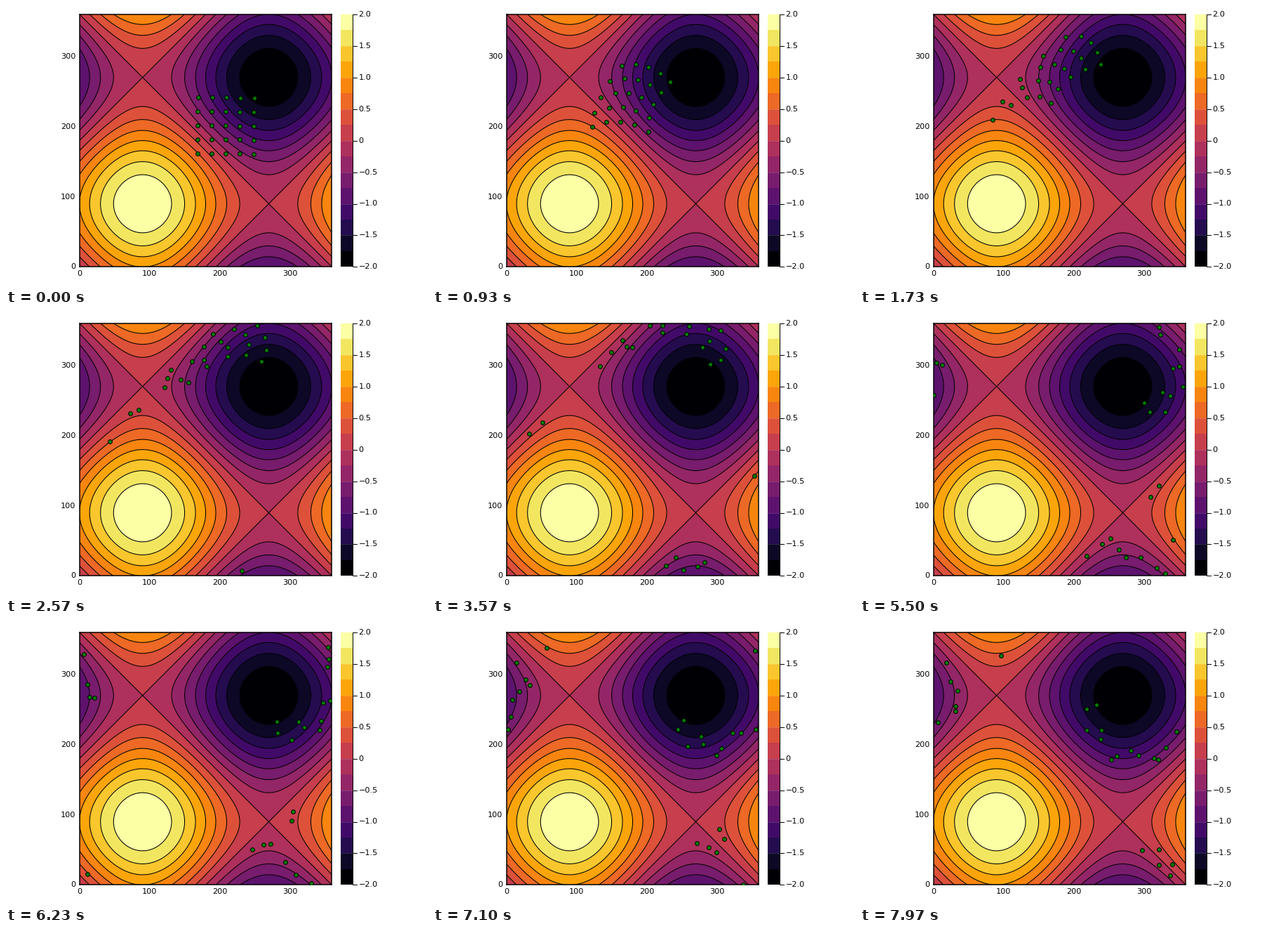
Recreate the animation shown at these times as a matplotlib script. Size 600x400 px, loop 8 s.

```python
import numpy as np
import matplotlib.pyplot as plt
from matplotlib.animation import FuncAnimation
from matplotlib.colors import ListedColormap
from matplotlib.patches import Rectangle

W, H, DPI = 600, 400, 100
PX = 72 / DPI                       # points per pixel
LEFT, RIGHT, TOP, BOTTOM = 104.7, 464.4, 11.8, 371.4
BAR_L, BAR_R = 476.8, 494.2
FRAMES = 240
STEP = 100 * np.pi / 180            # degrees per frame at unit speed

plt.rcParams["font.family"] = "DejaVu Sans"
fig = plt.figure(figsize=(W / DPI, H / DPI), dpi=DPI, facecolor="white")

# Pixel-space layer for labels and the colour bar
page = fig.add_axes([0, 0, 1, 1])
page.set(xlim=(0, W), ylim=(H, 0))
page.axis("off")


def label(x, y, text, ha):
    page.text(x, y, text, ha=ha, va="center_baseline" if ha == "x" else "center",
              fontsize=11.2 * PX, color="black")


# Field and contours
levels = np.linspace(-2, 2, 17)
cells = plt.get_cmap("inferno")(np.linspace(0, 1, 16))
deg = np.linspace(0, 360, 181)
wave = np.sin(np.radians(deg))
field = wave[None, :] + wave[:, None]

ax = fig.add_axes([LEFT / W, 1 - BOTTOM / H, (RIGHT - LEFT) / W, (BOTTOM - TOP) / H])
ax.contourf(deg, deg, field, levels=levels, cmap=ListedColormap(cells))
ax.contour(deg, deg, field, levels=levels[1:-1], colors="black",
           linewidths=1.05 * PX, linestyles="solid")
ax.set(xlim=(0, 360), ylim=(0, 360), xticks=[], yticks=[])
for spine in ax.spines.values():
    spine.set_linewidth(1.5 * PX)

for v in range(0, 301, 100):
    label(LEFT + v * (RIGHT - LEFT) / 360, 381, str(v), "center")
    label(99.5, BOTTOM - v * (BOTTOM - TOP) / 360, str(v), "right")

# Colour bar
cell_h = (BOTTOM - TOP) / 16
for i, color in enumerate(cells):
    page.add_patch(Rectangle((BAR_L, BOTTOM - (i + 1) * cell_h), BAR_R - BAR_L, cell_h,
                             facecolor=color, linewidth=0))
page.plot([BAR_R, BAR_R], [TOP, BOTTOM], color="black", lw=1 * PX)
for i, v in enumerate(np.arange(-2, 2.1, 0.5)):
    y = BOTTOM - 2 * i * cell_h
    page.plot([BAR_R, BAR_R + 5.3], [y, y], color="black", lw=1 * PX)
    if abs(v) < 2:
        page.plot([BAR_L, BAR_R], [y, y], color="white", alpha=0.35,
                  lw=0.9 * PX, ls=(0, (1, 1.2)))
    label(502.5, y, f"{v:.1f}".replace("-", "\u2212") if v else "0", "left")

# Particles carried along the contours by explicit Euler steps
x, y = (g.ravel() for g in np.meshgrid(np.arange(170.0, 251, 20), np.arange(160.0, 241, 20)))
path = []
for _ in range(FRAMES):
    x, y = (x + STEP * np.cos(np.radians(y)), y - STEP * np.cos(np.radians(x)))
    path.append((x % 360, y % 360))

dots, = ax.plot([], [], "o", ms=5.8 * PX, mfc="green", mec="black", mew=1 * PX, zorder=5)


def draw(i):
    dots.set_data(*path[i])
    return dots,


anim = FuncAnimation(fig, draw, frames=FRAMES, init_func=lambda: draw(0),
                     interval=8000 / FRAMES, repeat=True, repeat_delay=0)
plt.show()
```
